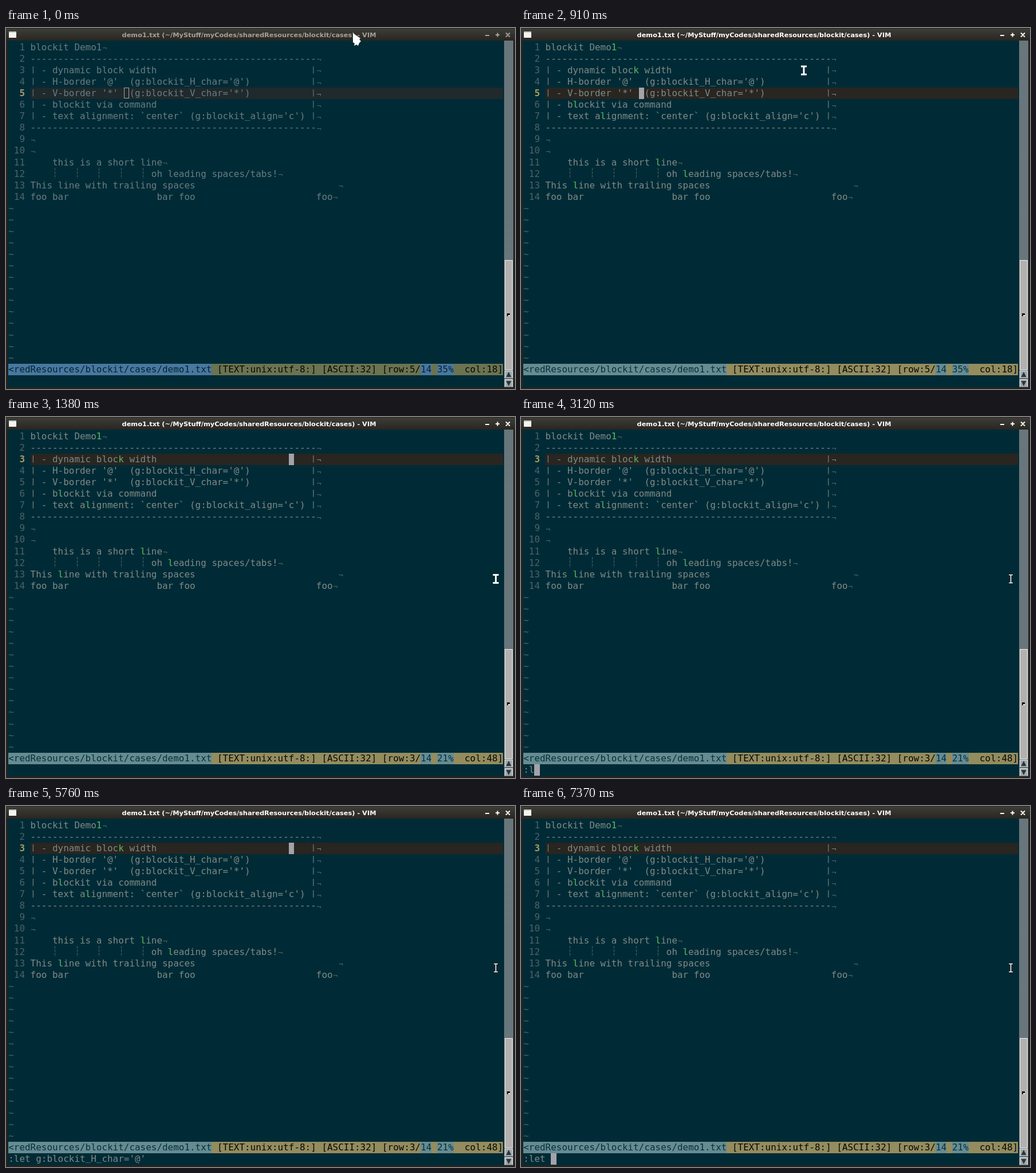
An HTML page with a canvas for the animation above (8 s loop, 889 by 630 pixels).

```html
<!DOCTYPE html>
<html lang="en">
<head>
<meta charset="utf-8">
<title>blockit demo</title>
<style>
  html, body { margin: 0; width: 100%; height: 100%; overflow: hidden; background: #002b36; }
  canvas { display: block; }
</style>
</head>
<body>
<canvas id="stage" width="889" height="630"></canvas>
<script>
const ctx = document.getElementById('stage').getContext('2d');
const LOOP = 8000, LEFT = 4.2, TOP = 23.8, CW = 9.6, RH = 20.07, GUTTER = 4;
const FONT_SIZE = 15.95, BG = '#002b36', GREEN = '#46a850';

const BLURRED = { text: '#687d80', dim: '#4d646b', mark: '#4c6268', row: '#20292c', num: '#a39a72',
  title: '#a3a199', blue: '#4878a0', olive: '#6c7350', path: '#06222e' };
const FOCUSED = { text: '#7f8a86', dim: '#4c6268', mark: '#566668', row: '#292520', num: '#a99c58',
  title: '#ffffff', blue: '#668c92', olive: '#948c5e', path: '#04303c' };

// Symbols set smaller or shifted: character -> [size, rise]
const symbols = { '|': [13, 2], '¬': [13, -0.5], '_': [FONT_SIZE, 1.5] };

const boxed = s => `| - ${s}`.padEnd(51) + '|';
const rule = '-'.repeat(52);
const lines = [
  'blockit Demo1', rule,
  boxed('dynamic block width'),
  boxed("H-border '@'  (g:blockit_H_char='@')"),
  boxed("V-border '*'  (g:blockit_V_char='*')"),
  boxed('blockit via command'),
  boxed("text alignment: `center` (g:blockit_align='c')"),
  rule, '', '',
  '    this is a short line',
  ' '.repeat(22) + 'oh leading spaces/tabs!',
  'This line with trailing spaces'.padEnd(56),
  'foo bar'.padEnd(23) + 'bar foo'.padEnd(29) + 'foo'
];
// Letters whose stems show a green fringe: line index -> column
const fringe = { 0: 12, 2: 16, 5: 5, 6: 10, 10: 20, 11: 25, 12: 5 };

// Command line over time: [start, text, cursor visible in command line]
const command = ":let g:blockit_H_char='@'";
const typing = [
  [0, '', false],
  [2280, ':', true], [3120, ':l', true], [3220, ':le', true], [3360, ':let', true],
  [3470, ':let ', true], [4090, command, true], [5760, command, false],
  [6600, ':', true], [7020, ':l', true], [7100, ':le', true], [7240, ':let', true],
  [7370, ':let ', true]
];

const colX = c => LEFT + c * CW;
const rowY = r => TOP + r * RH;

function rect(x, y, w, h, color) {
  ctx.fillStyle = color;
  ctx.fillRect(x, y, w, h);
}

// Fills whole character cells, snapped to pixels.
function cells(col, row, count, color) {
  const x = Math.round(colX(col));
  rect(x, Math.round(rowY(row)), Math.round(colX(col + count)) - x, 20, color);
}

function text(str, col, row, color, bold = false) {
  ctx.fillStyle = color;
  [...str].forEach((ch, i) => {
    if (ch === ' ') return;
    const [size, rise] = symbols[ch] || [FONT_SIZE, 0];
    ctx.font = `${bold ? 'bold ' : ''}${size}px "DejaVu Sans Mono", monospace`;
    ctx.fillText(ch, colX(col + i) + (FONT_SIZE - size) * 0.3, rowY(row) + 15 - rise);
  });
}

function shape(points, color) {
  ctx.beginPath();
  points.forEach(([x, y]) => ctx.lineTo(x, y));
  ctx.closePath();
  ctx.fillStyle = color;
  ctx.fill();
}

function strokes(segments, color, width) {
  ctx.beginPath();
  for (const [x1, y1, x2, y2] of segments) {
    ctx.moveTo(x1, y1);
    ctx.lineTo(x2, y2);
  }
  ctx.strokeStyle = color;
  ctx.lineWidth = width;
  ctx.stroke();
}

function makeHatch() {
  const tile = document.createElement('canvas');
  tile.width = tile.height = 2;
  const t = tile.getContext('2d');
  t.fillStyle = '#40535a';
  t.fillRect(0, 0, 2, 2);
  t.fillStyle = '#909a9d';
  t.fillRect(0, 0, 1, 1);
  t.fillRect(1, 1, 1, 1);
  return ctx.createPattern(tile, 'repeat');
}
const hatch = makeHatch();

function drawWindow(c) {
  rect(0, 0, 889, 630, '#25231e');
  rect(3, 22, 867, 605, BG);
  const bar = ctx.createLinearGradient(0, 0, 0, 22);
  bar.addColorStop(0, '#403e38');
  bar.addColorStop(1, '#282620');
  rect(0, 1, 889, 21, bar);
  rect(5, 6, 13, 11, '#f4f4f0');
  rect(5, 6, 13, 2, '#c4c4be');
  ctx.font = 'bold 11.37px "DejaVu Sans", sans-serif';
  ctx.fillStyle = c.title;
  ctx.fillText('demo1.txt (~/MyStuff/myCodes/sharedResources/blockit/cases) - VIM', 202.5, 16);
  strokes([[837, 13, 844, 13], [855, 12, 862, 12], [858.5, 8.5, 858.5, 15.5],
    [873, 8.5, 880, 15.5], [880, 8.5, 873, 15.5]], c.title, 2);
}

function drawScrollbar() {
  rect(870, 22, 16, 605, '#5c6c72');
  rect(870, 22, 16, 383, hatch);
  rect(871, 405, 14, 192, '#f0f0f0');
  rect(872, 406, 12, 190, '#b3b1b0');
  rect(875, 498, 5, 5, '#101010');
  rect(877, 501, 3, 2, '#f0f0f0');
  for (const y of [598, 613]) {
    rect(871, y, 14, 13, '#f0f0f0');
    rect(872, y + 1, 12, 12, '#a3a7a8');
  }
  shape([[878, 600], [882.5, 609], [873.5, 609]], '#26383e');
  shape([[873.5, 616], [882.5, 616], [878, 625]], '#26383e');
}

function drawBuffer(c, current, focused) {
  cells(GUTTER, current, 86, c.row);
  lines.forEach((line, r) => {
    const here = r === current;
    text(String(r + 1).padStart(2), 1, r, here ? c.num : c.dim, here);
    text(line, GUTTER, r, c.text);
    text('¬', GUTTER + line.length, r, here ? c.text : c.mark);
    if (focused && r in fringe) text(line[fringe[r]], GUTTER + fringe[r], r, GREEN);
  });
  ctx.setLineDash([4, 2]);
  strokes([4, 8, 12, 16, 20].map(col => {
    const x = Math.round(colX(GUTTER + col) + 4.3) + 0.5;
    return [x, 244.5, x, 263];
  }), c.mark, 1);
  ctx.setLineDash([]);
  for (let r = lines.length; r < 28; r++) text('~', 0, r, c.dim);
}

function drawStatus(c, clicked) {
  const [row, percent, col] = clicked ? [3, 21, 48] : [5, 35, 18];
  const parts = [
    ['<redResources/blockit/cases/demo1.txt', true],
    [` [TEXT:unix:utf-8:] [ASCII:32] [row:${row}/`, false],
    ['14', true], [' ', false], [`${percent}%`, true], [`  col:${col}]`, false]
  ];
  let at = 0;
  for (const [str, blue] of parts) {
    cells(at, 28, str.length, blue ? c.blue : c.olive);
    text(str, at, 28, blue ? c.path : '#040804');
    at += str.length;
  }
}

const block = (col, row) => cells(col, row, 1, '#a3a3aa');

function drawPointer(t) {
  const mix = (a, b, k) => a + (b - a) * k;
  let x = 494, y = 74;
  if (t < 910) {
    const step = t < 210 ? 0 : Math.floor((t - 210) / 44) + 1;
    const k = Math.min(1, step / 15), ease = k * k * (3 - 2 * k);
    x = mix(612, 494, ease);
    y = mix(20, 75.5, ease);
  } else if (t >= 1180) {
    const k = Math.min(6, Math.floor((t - 1180) / 40) + 1) / 6;
    const ease = k * k * (3 - 2 * k);
    x = mix(494, 855.5, ease);
    y = mix(74, 282.5, ease);
  }
  if (y < 24) {
    shape([[-6, -11], [7, -2], [5, 0], [8, 3], [5, 6], [3, 11], [0, 9], [-4, 11], [-3, 7], [-6, 5]]
      .map(([dx, dy]) => [x + dx, y + dy]), '#ffffff');
    return;
  }
  const beam = (w, h) => [[x, y - h, x, y + h], [x - w, y - h, x + w, y - h], [x - w, y + h, x + w, y + h]];
  if (t < 2280) {
    strokes(beam(5, 7), '#ffffff', 3);
  } else {
    strokes(beam(4.5, 7), '#06181e', 4);
    strokes(beam(3.5, 7), '#ffffff', 1.6);
  }
}

function draw(t) {
  const focused = t >= 910, clicked = t >= 960;
  const c = focused ? FOCUSED : BLURRED;
  const [, typed, inCommand] = typing.findLast(([start]) => t >= start);

  drawWindow(c);
  drawScrollbar();
  drawBuffer(c, clicked ? 2 : 4, focused);
  drawStatus(c, clicked);
  text(typed, 0, 29, c.text);

  if (inCommand) block(typed.length, 29);
  else if (clicked) block(GUTTER + 47, 2);
  else if (focused) block(GUTTER + 17, 4);
  else {
    ctx.strokeStyle = '#a3a3aa';
    ctx.lineWidth = 1;
    ctx.strokeRect(206.5, 104.5, 8, 18);
  }
  drawPointer(t);
}

function tick() {
  draw(performance.now() % LOOP);
  requestAnimationFrame(tick);
}
tick();
</script>
</body>
</html>
```
